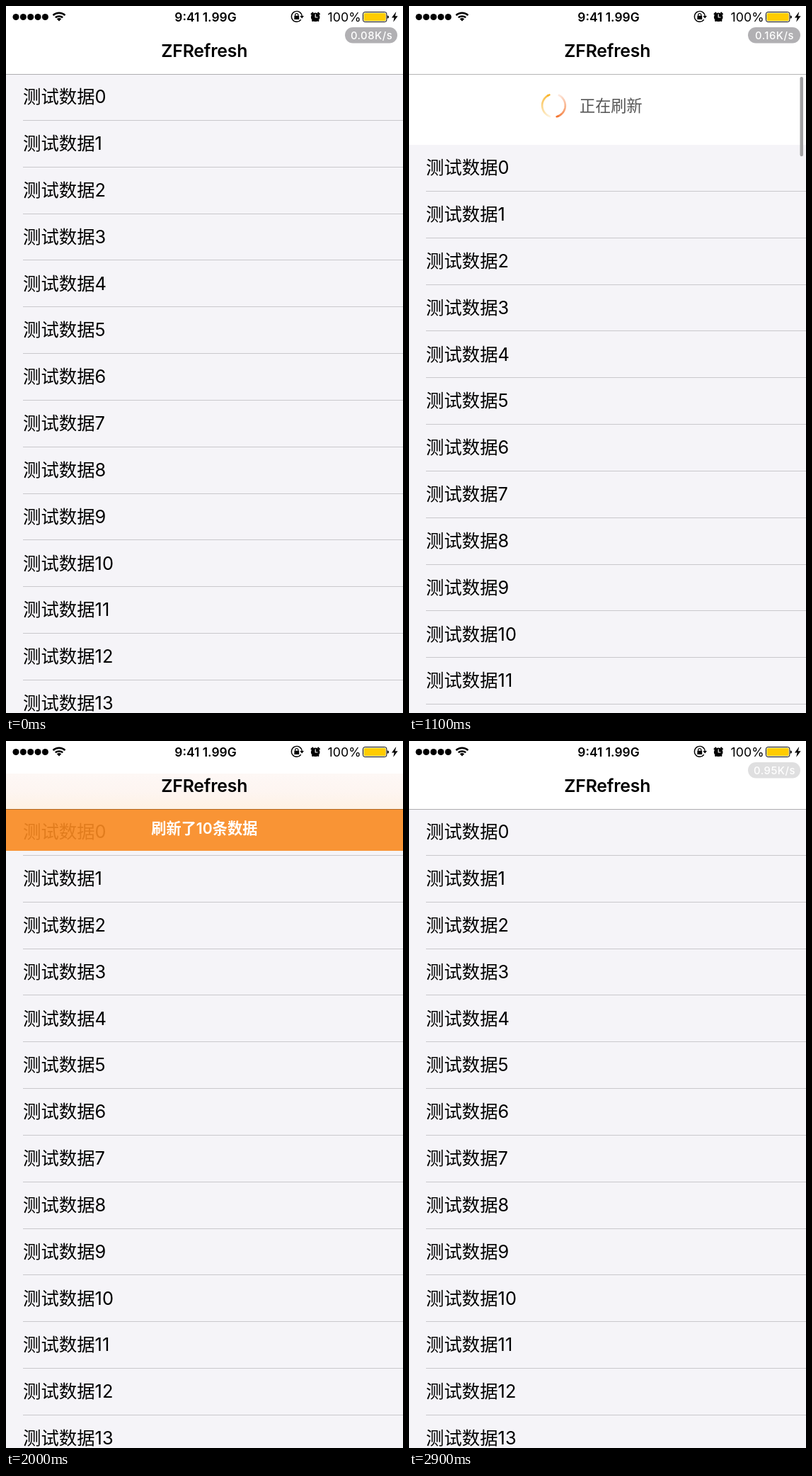
An HTML page that plays this animation: 561 px wide and 998 px high, repeating every 3 s.

```html
<!DOCTYPE html>
<html lang="zh-CN">
<head>
<meta charset="utf-8">
<title>ZFRefresh</title>
<style>
  html, body { margin: 0; width: 100%; height: 100%; overflow: hidden; background: #fff; }
  svg { display: block; width: 561px; height: 998px; }
  text { font-family: Inter, "Noto Sans CJK SC", "Noto Sans CJK", sans-serif; }
  .row { font-size: 25.4px; }
  .line { fill: none; stroke-linecap: round; stroke-linejoin: round; }
</style>
</head>
<body>
<svg viewBox="0 0 561 998">
  <defs>
    <clipPath id="content"><rect y="96" width="561" height="902"/></clipPath>
    <linearGradient id="tintFill" x1="0" y1="0" x2="0" y2="1">
      <stop offset="0" stop-color="#fdf5f2"/>
      <stop offset=".5" stop-color="#fdf2ec"/>
      <stop offset="1" stop-color="#feeddb"/>
    </linearGradient>
  </defs>
  <rect width="561" height="998" fill="#fff"/>

  <g clip-path="url(#content)">
    <g id="arrow" class="line" stroke="#f08322" stroke-width="2.6">
      <path d="M204.5 153V128M197.3 135L204.5 127.7L211.7 135"/>
    </g>
    <g id="spinner" class="line" stroke-width="2.7"></g>
    <text id="label" x="241" y="149" font-size="22.2" font-weight="500" fill="#555"></text>
    <g id="list"><rect y="96" width="561" height="1100" fill="#f5f4f8"/></g>
    <rect id="bar" x="552.5" y="100" width="4.5" rx="2.25" fill="#a0a0a2"/>
    <g id="banner">
      <rect y="-66" width="561" height="66" fill="#fa8a21" opacity=".9"/>
      <text x="280.3" y="-24.5" font-size="21.2" font-weight="600" fill="#fff" text-anchor="middle">刷新了10条数据</text>
    </g>
  </g>

  <rect id="tint" width="561" fill="url(#tintFill)"/>
  <rect y="96" width="561" height="1" fill="#000" opacity=".29"/>
  <text x="280.3" y="72" font-size="24.8" font-weight="600" letter-spacing="-.2" text-anchor="middle">ZFRefresh</text>

  <g id="status">
    <text x="282" y="21.5" font-size="17.4" font-weight="600" text-anchor="middle">9:41 1.99G</text>
    <text x="454.5" y="22" font-size="17.8">100%</text>
    <g class="line" stroke="#000" style="stroke-linecap:butt">
      <path d="M66.5 13.2A12.5 12.5 0 0 1 83.5 13.2M69.8 16.3A8 8 0 0 1 80.2 16.3" stroke-width="2.5"/>
      <path d="M416.8 19.2A7.4 7.4 0 1 1 418.2 14.5" stroke-width="1.4"/>
      <path d="M408.7 14V12.6A2.1 2.1 0 0 1 412.9 12.6V14" stroke-width="1.2"/>
      <path d="M431 12L434 9M440.5 9L443.5 12M432.5 21.5L434 20M442 21.5L440.5 20" stroke-width="2"/>
    </g>
    <path d="M75 21.5L71.8 18.2A4.6 4.6 0 0 1 78.2 18.2Z"/>
    <path d="M407.4 13.8H414.2V19H407.4ZM415.3 14H421L418.2 17.6Z"/>
    <circle cx="437.2" cy="15.7" r="6.3"/>
    <path class="line" d="M437.2 11.8V16H440" stroke="#fff" stroke-width="1.2"/>
    <rect x="504.5" y="8.6" width="33.4" height="13.8" rx="2.6" fill="#fff" stroke="#000" stroke-width="1"/>
    <rect x="505.8" y="9.9" width="30.8" height="11.2" rx="1.5" fill="#fc0"/>
    <path d="M538.8 13.2Q541 13.7 541 15.5T538.8 17.8Z"/>
    <path d="M551.3 8L545 16.4H548.6L547.2 22.8L553.6 14.2H549.9Z"/>
  </g>

  <g id="badge">
    <rect x="479" y="30" width="74" height="22.5" rx="11.2" fill="#b1b0b3"/>
    <text id="speed" x="516.5" y="46.5" font-size="14.8" font-weight="500" letter-spacing=".5" fill="#fff" text-anchor="middle"></text>
  </g>
</svg>
<script>
const LOOP = 3000, TICK = 100, ROW = 65.83;
const $ = id => document.getElementById(id);
const set = (id, attrs) => {
  for (const name in attrs) $(id).setAttribute(name, attrs[name]);
};
const add = (parent, tag, attrs, text = '') => {
  const node = document.createElementNS('http://www.w3.org/2000/svg', tag);
  for (const name in attrs) node.setAttribute(name, attrs[name]);
  node.textContent = text;
  $(parent).appendChild(node);
};

// Linear interpolation through [time, value] pairs.
const track = (...keys) => t => {
  const i = keys.findIndex(key => key[0] > t);
  if (i < 0) return keys[keys.length - 1][1];
  if (i === 0) return keys[0][1];
  const [t0, v0] = keys[i - 1], [t1, v1] = keys[i];
  return v0 + (v1 - v0) * (t - t0) / (t1 - t0);
};

const pull = track([600, 0], [700, 175], [800, 168], [900, 150], [1000, 121],
  [1100, 100], [1200, 89], [1800, 89], [1900, 38], [2000, 0]);
const tilt = track([700, -18], [800, -8], [900, -1.5], [1000, 0]);
const barLength = track([700, 11], [800, 36], [900, 71], [1200, 133]);
const barOpacity = track([600, 0], [700, 1], [1100, 1], [1300, 0]);
const bannerBottom = track([1800, 96], [1900, 130], [2000, 155], [2100, 162],
  [2600, 162], [2700, 141], [2800, 108], [2900, 96]);
const badgeOpacity = track([1200, 1], [1300, .7], [1700, 0], [2800, 0], [2900, .4]);

for (let i = 0; i < 5; i++) add('status', 'circle', { cx: 14 + 10.35 * i, cy: 15.5, r: 4.5 });

for (let i = 0; i < 15; i++) {
  add('list', 'text', { class: 'row', x: 24, y: 137.3 + ROW * i }, '测试数据' + i);
  add('list', 'rect', { x: 24, y: Math.round(161 + ROW * i), width: 537, height: 1, fill: '#c9c8cc' });
}

// Two comet-shaped arcs, fading towards their tails.
const ringPoint = deg => {
  const a = deg * Math.PI / 180;
  return `${(16.3 * Math.cos(a)).toFixed(2)} ${(16.3 * Math.sin(a)).toFixed(2)}`;
};
for (const [start, color] of [[178, '#f9b52c'], [5, '#f4752f']]) {
  const steps = 20, sweep = 142 / steps;
  for (let i = 0; i < steps; i++) {
    const from = start + i * sweep;
    add('spinner', 'path', {
      d: `M${ringPoint(from)}A16.3 16.3 0 0 1 ${ringPoint(from + sweep)}`,
      stroke: color, opacity: .12 + .88 * (i + 1) / steps,
      'stroke-linecap': i === steps - 1 ? 'round' : 'butt',
      style: i === steps - 1 ? '' : 'stroke-linecap:butt'
    });
  }
}

function draw(t) {
  const refreshing = t >= 1000;
  const bottom = bannerBottom(t), hidden = 162 - bottom;
  const bannerShown = t >= 1900 && t < 2900;
  const tintTop = Math.max(16, 60 - 2 * hidden);

  set('list', { transform: `translate(0 ${Math.round(pull(t))})` });
  set('arrow', { transform: `rotate(${tilt(t)} 204.5 140.5)`, opacity: refreshing ? 0 : 1 });
  set('spinner', {
    transform: `translate(204.5 140.5) rotate(${(t - 1300) * .36})`,
    opacity: refreshing ? 1 : 0
  });
  $('label').textContent = refreshing ? '正在刷新' : '下拉刷新';
  set('bar', { height: barLength(t), opacity: barOpacity(t) });
  set('banner', { transform: `translate(0 ${bottom})`, opacity: bannerShown ? 1 : 0 });
  set('tint', {
    y: tintTop, height: 96 - tintTop,
    opacity: bannerShown && hidden > 0 ? Math.min(1, .6 + hidden / 50) : 0
  });
  set('badge', { opacity: badgeOpacity(t) });
  $('speed').textContent = t < 800 ? '0.08K/s' : t < 2000 ? '0.16K/s' : '0.95K/s';
}

const begin = performance.now();
function loop() {
  const t = (performance.now() - begin) % LOOP;
  draw(Math.floor(t / TICK) * TICK);
  requestAnimationFrame(loop);
}
loop();
</script>
</body>
</html>
```
